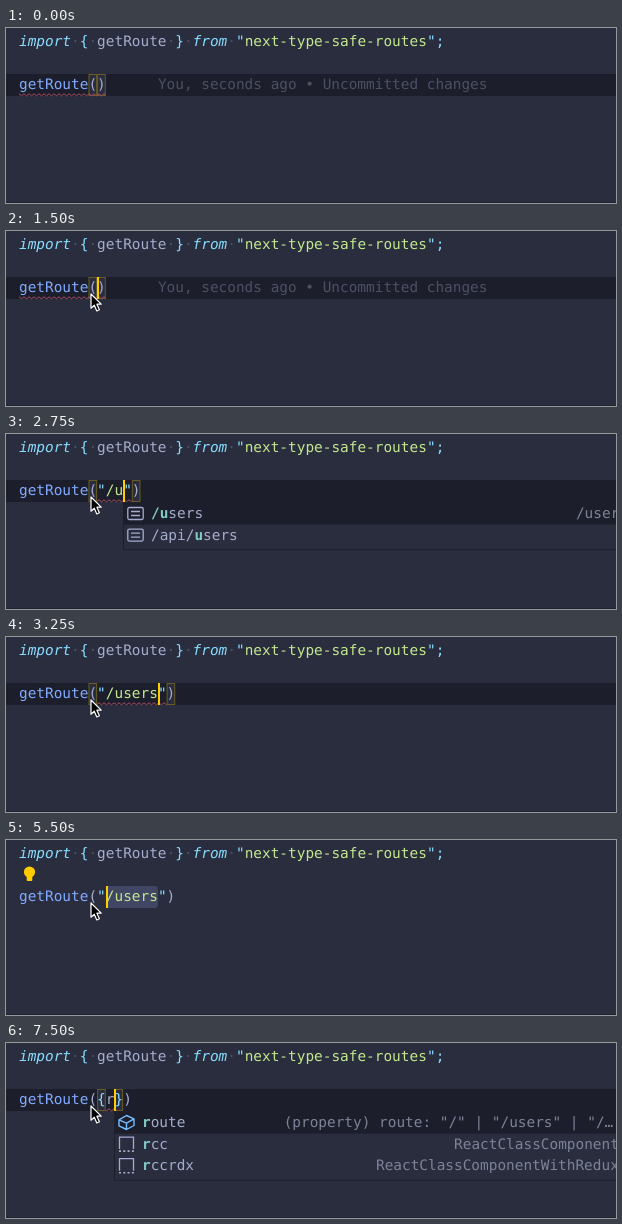
Write an HTML page that moves like this. It is 610 by 175 pixels and loops after 8 s.

```html
<!DOCTYPE html>
<html lang="en">
<head>
<meta charset="utf-8">
<title>Typed routes in the editor</title>
<style>
  html, body { margin: 0; width: 100%; height: 100%; overflow: hidden; background: #292d3e; }
  svg { display: block; width: 610px; height: 175px; }
  text {
    font: 14.42px "DejaVu Sans Mono", "Liberation Mono", monospace;
    text-rendering: geometricPrecision;
    white-space: pre;
  }
</style>
</head>
<body>
<svg id="stage" viewBox="0 0 610 175">
  <defs>
    <pattern id="squiggle" width="5" height="4" x="13" y="65" patternUnits="userSpaceOnUse">
      <path d="M-1 .2 L0 .8 L2.5 2.8 L5 .8 L6 .2" fill="none" stroke="#a64c60"/>
    </pattern>
  </defs>
  <rect width="610" height="175" fill="#292d3e"/>
  <rect y="174" width="610" height="1" fill="#1f2230"/>
  <g id="importLine"></g>
  <g id="scene"></g>
</svg>
<script>
const LOOP = 8000, LEFT = 13, CHAR = 8.68, ROW = 21.6;
const LINE_TOP = 46, LINE_HEIGHT = 22;
const color = {
  cyan: '#89ddff', plain: '#a6accd', call: '#82aaff', string: '#c3e88d',
  dim: '#4c5064', dark: '#1c1f2b', teal: '#80cbc4', caret: '#ffcc00', detail: '#7d8298'
};

const columnX = col => LEFT + col * CHAR;
const escapeText = s => s.replace(/&/g, '&amp;').replace(/</g, '&lt;');
const text = (x, y, s, fill, style = '') =>
  `<text x="${x}" y="${y}" fill="${fill}" style="${style}">${escapeText(s)}</text>`;
const rect = (x, y, w, h, fill, more = '') =>
  `<rect x="${x}" y="${y}" width="${w}" height="${h}" fill="${fill}" ${more}/>`;

// Lays [string, colour, style] parts out along the character grid.
function tokens(parts, y) {
  let col = 0;
  return parts.map(([s, fill, style]) => {
    const out = text(columnX(col), y, s, fill, style);
    col += s.length;
    return out;
  }).join('');
}

function codeLine(code) {
  let quoted = false;
  const parts = code.match(/["(){}]|[^"(){}]+/g).map(s => {
    if (s === '"') { quoted = !quoted; return [s, color.cyan]; }
    if (quoted) return [s, color.string];
    return [s, /[{}]/.test(s) ? color.cyan : color.plain];
  });
  return tokens([['getRoute', color.call], ...parts], 61);
}

const icons = {
  value: `<g fill="none" stroke="#a6accd" stroke-width="1.3">
    <rect x=".8" y="-6" width="15.4" height="12" rx="1.5"/><path d="M4 -2 H13 M4 2 H13"/></g>`,
  field: `<path d="M8.5 -7 L16 -3.6 V3 L8.5 7 L1 3.4 V-2.6 Z M1 -2.6 L8.5 .6 L16 -3.6 M8.5 .6 V7"
    fill="none" stroke="#75beff" stroke-width="1.4" stroke-linejoin="round"/>`,
  snippet: `<path d="M1.5 5 V-7 H15.5 V5" fill="none" stroke="#a6accd" stroke-width="1.3"/>
    <path d="M1 7 H16" stroke="#a6accd" stroke-width="1.6" stroke-dasharray="2 2.3"/>`
};

// Each row: icon, label, start and end of the matched letters, detail.
const lists = {
  all: { col: 11, rows: [
    ['value', '/', 0, 1, '/'], ['value', '/users', 0, 1, ''], ['value', '/api/users', 0, 1, '']] },
  users: { col: 12, rows: [
    ['value', '/users', 0, 2, '/users'], ['value', '/api/users', 5, 6, '']] },
  props: { col: 11, rows: [
    ['field', 'route', 0, 1, '(property) route: "/" | "/users" | "/…'],
    ['snippet', 'rcc', 0, 1, 'ReactClassComponent'],
    ['snippet', 'rccrdx', 0, 1, 'ReactClassComponentWithRedux']] }
};

function suggestions({ col, rows }) {
  const x = Math.round(columnX(col)), top = 68, height = rows.length * ROW + 4;
  const body = rows.map(([icon, label, from, to, detail], i) => {
    const mid = 79.5 + i * ROW, labelX = x + 28;
    const end = x + 505 - (detail.endsWith('…') ? 5.5 : 0);
    return `<g transform="translate(${x + 4} ${mid})">${icons[icon]}</g>` +
      text(labelX, mid + 4.7, label.slice(0, from), color.plain) +
      text(labelX + from * CHAR, mid + 4.7, label.slice(from, to), color.teal, 'font-weight:bold') +
      text(labelX + to * CHAR, mid + 4.7, label.slice(to), color.plain) +
      text(end - detail.length * CHAR, mid + 4.7, detail, color.detail);
  }).join('');
  return rect(x + .5, top + .5, 520, height, '#292d3e', 'stroke="#1d202c"') +
    rect(x + 1, top + 1, 520, ROW, color.dark) + body;
}

const pointer = ([x, y]) =>
  `<path transform="translate(${x} ${y})" d="M0 0 V14.2 L3.3 11.2 L5.8 17 L8.4 15.8 L5.9 10.2 H10.2 Z"
    fill="#000" stroke="#fff" stroke-width="1.2" stroke-linejoin="round"/>`;

const bulb = `<g fill="#ffcc00"><circle cx="23.5" cy="32" r="5.6"/>
  <path d="M20.7 35 H26.3 V40 Q26.3 41 25.3 41 H21.7 Q20.7 41 20.7 40 Z"/></g>`;

function draw(s) {
  let out = '';
  if (s.line) out += rect(0, LINE_TOP, 610, LINE_HEIGHT, color.dark);
  if (s.selection) {
    const [a, b] = s.selection;
    out += rect(columnX(a), LINE_TOP, (b - a) * CHAR, LINE_HEIGHT, '#404663', 'rx="3"');
  }
  for (const col of s.marks) {
    out += rect(columnX(col) + .5, LINE_TOP + .5, CHAR - 1, LINE_HEIGHT - 1, '#292d3e',
      'stroke="#ffcc00" stroke-opacity=".32"');
  }
  out += codeLine(s.code);
  if (s.wave) {
    const [a, b] = s.wave;
    out += rect(columnX(a), 65, (b - a) * CHAR, 4, 'url(#squiggle)');
  }
  if (s.blame) out += text(columnX(16), 61, 'You, seconds ago • Uncommitted changes', color.dim);
  if (s.bulb) out += bulb;
  if (s.caret) out += rect(Math.round(columnX(s.caret)), LINE_TOP, 2, LINE_HEIGHT, color.caret);
  if (s.list) out += suggestions(lists[s.list]);
  if (s.mouse) out += pointer(s.mouse);
  return out;
}

// Every step lists only what changes from the one before.
const steps = [
  [0, { code: '()', caret: 0, marks: [8, 9], wave: [0, 10], blame: true, line: true }],
  [250, { mouse: [598, 92] }],
  [500, { mouse: [452, 96], caret: 9 }],
  [750, { mouse: [240, 92] }],
  [1000, { mouse: [100, 82], caret: 0 }],
  [1250, { mouse: [85, 63] }],
  [1500, { caret: 9 }],
  [1750, { code: '("")', caret: 10, marks: [8, 11], wave: [0, 12], blame: false }],
  [2000, { code: '("/")', caret: 11, marks: [8, 12], wave: [0, 13] }],
  [2250, { list: 'all' }],
  [2500, { wave: [9, 12] }],
  [2750, { code: '("/u")', caret: 12, marks: [8, 13], wave: [9, 13], list: 'users' }],
  [3250, { code: '("/users")', caret: 16, marks: [8, 17], wave: [9, 17], list: null }],
  [3750, { caret: 0, wave: null }],
  [4250, { caret: 16 }],
  [4750, { caret: 0 }],
  [5000, { caret: 11, selection: [11, 16], marks: [], line: false }],
  [5250, { caret: 10, selection: [10, 16] }],
  [5500, { bulb: true }],
  [5750, { code: '("")', caret: 10, selection: null, marks: [8, 11], line: true }],
  [6000, { code: '()', caret: 9, marks: [8, 9], wave: [0, 10], bulb: false }],
  [6250, { code: '({})', caret: 10, marks: [9, 10], wave: [0, 12] }],
  [6750, { caret: 0 }],
  [7250, { code: '({r})', caret: 11, marks: [9, 11], wave: [10, 11] }],
  [7500, { list: 'props' }]
];
let state = {};
const scenes = steps.map(([at, change]) => ({ at, markup: draw(state = { ...state, ...change }) }));

const space = ['·', color.dim], italic = 'font-style:italic';
document.getElementById('importLine').innerHTML = tokens([
  ['import', color.cyan, italic], space, ['{', color.cyan], space, ['getRoute', color.plain], space,
  ['}', color.cyan], space, ['from', color.cyan, italic], space, ['"', color.cyan],
  ['next-type-safe-routes', color.string], ['";', color.cyan]
], 18);

const sceneNode = document.getElementById('scene');
const start = performance.now();
let shown;
function tick() {
  const time = (performance.now() - start) % LOOP;
  const scene = scenes.findLast(({ at }) => at <= time);
  if (scene !== shown) {
    sceneNode.innerHTML = scene.markup;
    shown = scene;
  }
  requestAnimationFrame(tick);
}
tick();
</script>
</body>
</html>
```
